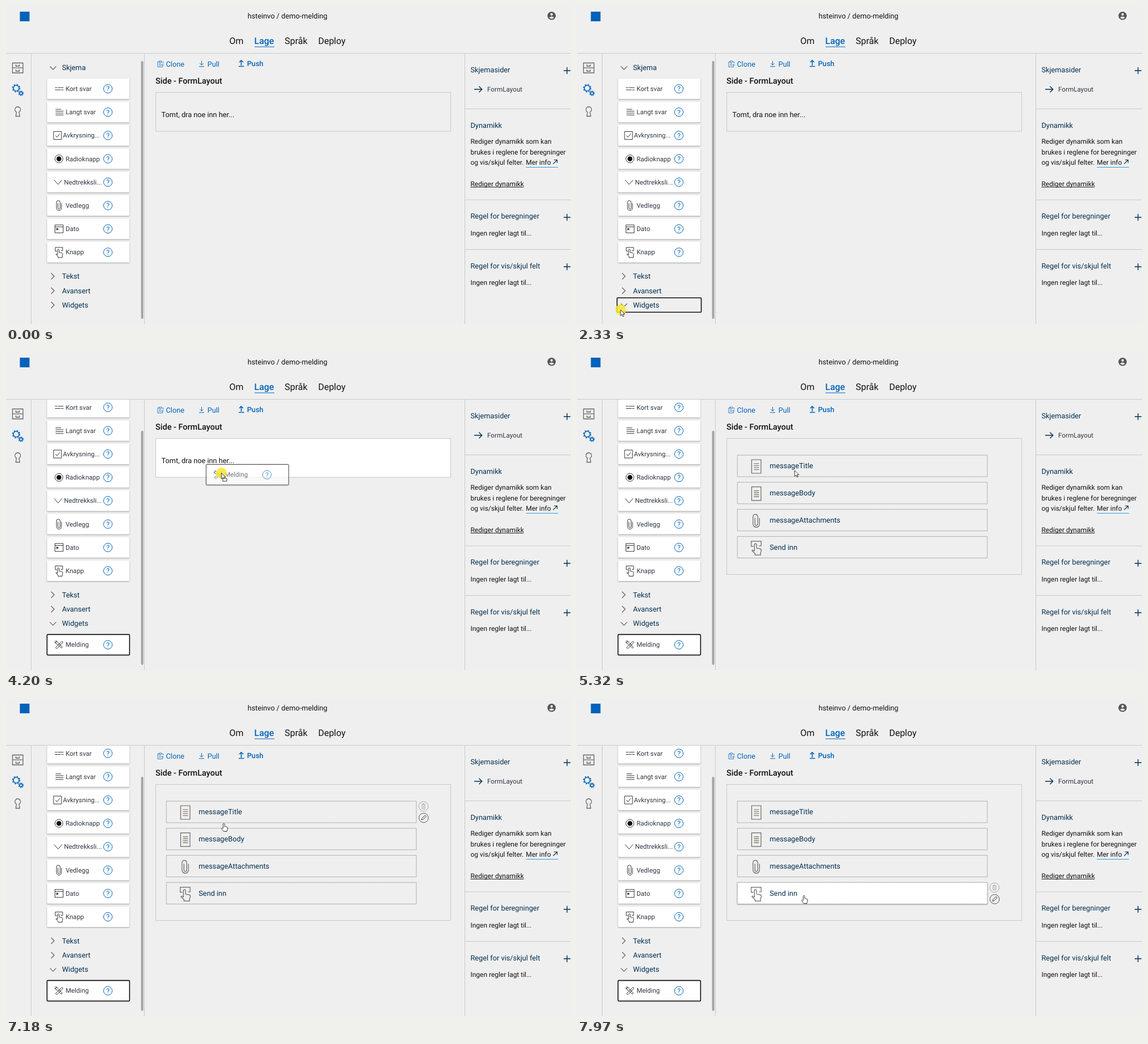
An HTML page that plays this animation: 998 px wide and 561 px high, repeating every 8000 ms.

```html
<!DOCTYPE html>
<html lang="no">
<head>
<meta charset="utf-8">
<title>Demo</title>
<style>
  html, body { margin: 0; width: 100%; height: 100%; overflow: hidden; background: #efefef; }
  svg { display: block; font: 12.76px Roboto, sans-serif; text-rendering: geometricPrecision; }
  text { fill: #022f51; white-space: pre; }
  .nav { font-size: 15.95px; }
  .dark text, text.dark { fill: #111; }
  .blue text, text.blue { fill: #0062ba; }
  .small { font-size: 11.96px; }
  .label { font-size: 11.5px; fill: #303944; }
  .bold { font-weight: 500; }
  .line { fill: none; stroke: #c9c9c9; }
  .icon { fill: none; stroke: #333; }
  .gray { fill: none; stroke: #666; stroke-width: 1.3; }
  .navy { fill: none; stroke: #022f51; stroke-width: 1.4; }
  .azure { fill: none; stroke: #0062ba; }
  .thin { stroke-width: .8; }
  .card { fill: #fff; filter: drop-shadow(0 1px 1px #0005); }
  .focus { fill: none; stroke: #111; stroke-width: 1.6; }
  #ghost .focus { stroke-width: 1.1; }
  .pointer path { fill: #fff; stroke: #222; stroke-width: .9; stroke-linejoin: round; }
</style>
</head>
<body>
<svg width="998" height="561" viewBox="0 0 998 561">
  <defs>
    <clipPath id="paletteClip"><path d="M45 84h199v462H45z"/></clipPath>
    <g id="short"><path d="M-7-2h4m1 0h10M-7 2h10m1 0h4"/></g>
    <g id="long"><path d="M-6-5H4M-6-1.7H8M-6 1.7H8M-6 5H8"/></g>
    <g id="check"><path d="M-9.5-7h14v14h-14zM-6 0l2.5 3 5-6"/></g>
    <g id="radio"><circle r="7"/><circle r="4.3" fill="#111" stroke="none"/></g>
    <g id="drop"><path d="M-8.5-4L-1.5 4L5.5-4"/></g>
    <g id="clip"><path d="M-1.7-4V4.500a1.900 1.900 0 0 0 3.800 0V-5.500a3.200 3.200 0 0 0-6.400 0V4.500a4.400 4.400 0 0 0 8.800 0V-4"/></g>
    <g id="date"><path d="M-7-7H7.500V7H-7zM-7-3.500H7.500"/><path d="M-4.500-.5h3v2h-3z" fill="#a44"/></g>
    <g id="tap"><path d="M-3.500-2H-6.500V-8.500H6.500V-2.500H3.500M-2.300 4.500V-4a1.400 1.400 0 0 1 2.800 0V.5l4.500.8q2 .4 1.700 2.600L5.800 6.500V9.500H-1.500V7.500L-5.500 3.800q.7-1.900 3.200.7"/></g>
    <g id="tools"><path d="M-6 5L4-5l2-1 1 1-1 2L-4 7zM-6-7l3 1 2 3 7 7-1.500 2-7-7-3-1-2-3 2 1 1.500-1z"/></g>
    <g id="doc"><path d="M-8-12H8.500V12H-8z"/><path d="M-4-5H5M-4-1.500H5M-4 2H5M-4 5.500H5" stroke="#765"/></g>
    <path id="plus" class="navy" d="M-6 0H6M0-6V6"/>
    <g id="arrow" class="pointer"><path d="M0 0v10.300l2.400-2.200 1.700 3.700 1.700-.8-1.600-3.500h3.300z"/></g>
    <g id="drag" class="pointer"><path d="M0 0v10.300l2.400-2.200 1.700 3.700 1.700-.8-1.600-3.500h3.300z"/><path d="M2.500 9.500h7v5h-7z"/></g>
    <g id="hand" class="pointer"><path d="M-1.500 8V1.200a1.300 1.300 0 0 1 2.600 0V5q1.500-.6 2 .6 1.300-.4 1.700.7 1.500-.2 1.500 1.200v2.300L5 14H-.5L-4.500 8.800q.8-1.600 3-.3z"/></g>
    <g id="grab" class="pointer"><path d="M-2 7V1.500q1.200-1.400 2 0 1-1.600 2 0 1.200-1 2 .6 1.500-.5 1.500 1V8L4.500 12.500H-1L-4.500 7q.8-1.600 2.500 0z"/></g>
  </defs>

  <rect width="998" height="561" fill="#efefef"/>
  <rect x="24.5" y="10" width="17" height="17" fill="#0062ba"/>
  <text class="dark" x="497.2" y="21.700" text-anchor="middle">hsteinvo / demo-melding</text>
  <g fill="#555"><circle cx="963.7" cy="17.3" r="7.3"/><g fill="#efefef"><circle cx="963.7" cy="14.7" r="2.2"/><path d="M959.3 20.500q4.400-4 8.800 0-4.400 4-8.800 0z"/></g></g>
  <g class="nav dark">
    <text x="394.6" y="67">Om</text><text x="492.3" y="67">Språk</text><text x="551.5" y="67">Deploy</text>
  </g>
  <text class="nav blue bold" x="438.5" y="67">Lage</text>
  <path class="azure" d="M439 72h35"/>
  <path class="line" d="M0 83.500H998M44.500 84V561M244.500 84V561M810.500 84V561M811 181.500H998M811 342H998M811 429.500H998"/>

  <path class="gray" d="M11.500 100.500h18.500v17.500h-18.500zM11.500 109.200h18.500M17.500 103v3h6v-3M17.500 112v3h6v-3"/>
  <g class="azure" stroke-width="1.6">
    <circle cx="18" cy="145" r="5"/><circle cx="18" cy="145" r="6.5" stroke-dasharray="2.5 2.6"/>
    <circle cx="26.5" cy="154" r="2.5"/><circle cx="26.5" cy="154" r="4" stroke-dasharray="1.6 1.54"/>
  </g>
  <path class="gray" d="M18.500 187.200a5 5 0 1 1 4.500 0l1.300 7.300h-7z"/>

  <g id="palette" clip-path="url(#paletteClip)"><g id="content"></g></g>
  <rect id="thumb" x="238.6" width="4" rx="2" fill="#a3a3a3"/>

  <g class="azure">
    <path class="thin" d="M270 98.500h-2v9h8.500v-2M276 98.500h1.500v3M270.500 97h4v2.500h-4zM270 102h4M270 104.500h4M279 104h-4l1.500-1.500M275 104l1.500 1.500"/>
    <path d="M345.500 97v7M342.500 101.200l3 3 3-3M341 106.800h9"/>
    <path d="M415.500 105V96M412 99.300l3.500-3.500 3.500 3.500M411 106.500h9.500" stroke-width="1.6"/>
  </g>
  <g class="blue"><text x="282.5" y="107">Clone</text><text x="355.7" y="107">Pull</text><text class="bold" x="425.7" y="105.5">Push</text></g>
  <text class="dark bold" x="264" y="136.5" style="font-size:14.5px">Side - FormLayout</text>
  <rect id="panel" class="line" x="264.5" y="152.5" width="521" height="68.5"/>
  <text id="empty" class="dark" x="274.6" y="196">Tomt, dra noe inn her...</text>
  <g id="items"></g>

  <text x="820.5" y="117">Skjemasider</text>
  <path class="navy" d="M827 147h13.500M835.500 141.700l5.300 5.300-5.300 5.300"/>
  <text class="label" x="850" y="151" style="font-size:11.7px">FormLayout</text>
  <text x="820.5" y="215">Dynamikk</text>
  <g class="small dark">
    <text x="820.5" y="243">Rediger dynamikk som kan</text>
    <text x="820.5" y="261.5">brukes i reglene for beregninger</text>
    <text x="820.5" y="280">og vis/skjul felter.</text>
    <text x="918.3" y="280">Mer info</text>
    <text x="820.5" y="317.5">Rediger dynamikk</text>
    <text x="820.5" y="404.7">Ingen regler lagt til...</text>
    <text x="820.5" y="492">Ingen regler lagt til...</text>
  </g>
  <path d="M918.500 284.500H975" stroke="#2a9fe0"/>
  <path d="M820.500 319.500h94" stroke="#222"/>
  <path class="navy" d="M966.500 278.500l6.500-6.500M968 271.500h5.500v5.500" style="stroke-width:1.1"/>
  <text x="820.5" y="375.200">Regel for beregninger</text>
  <text x="820.5" y="462.500">Regel for vis/skjul felt</text>
  <use href="#plus" x="991" y="114"/><use href="#plus" x="991" y="372.7"/><use href="#plus" x="991" y="460"/>

  <g id="ghost" opacity=".7"></g>
  <circle id="press" r="9.5" fill="#f7e733" opacity=".85"/>
  <use id="cursor"/>
</svg>
<script>
const $ = id => document.getElementById(id);
const show = (el, on) => el.setAttribute('visibility', on ? 'visible' : 'hidden');
const set = (el, attrs) => { for (const k in attrs) el.setAttribute(k, attrs[k]); };

const LOOP = 8000, SCROLL = 48.4, PITCH = 47.8, ROW_TOP = 182, MELDING_Y = 564.9;

const card = (icon, label, y, x = 105.2) => `
  <rect class="card" x="72.5" y="${y - 18.3}" width="145.5" height="36.3" rx="1"/>
  <use class="icon" href="#${icon}" x="93.5" y="${y}"/>
  <text class="label" x="${x}" y="${y + 4}">${label}</text>
  <circle class="azure" cx="180" cy="${y}" r="7.6"/>
  <text class="blue" x="180" y="${y + 4.3}" text-anchor="middle" style="font-size:12px">?</text>`;

const section = (label, y, open) => `
  <text x="99" y="${y + 4.3}">${label}</text>
  <path class="gray" d="${open ? `M77.5 ${y - 2.5}l5.5 5.5 5.5-5.5` : `M79.7 ${y - 5.5}l5.5 5.5-5.5 5.5`}"/>`;

const cards = [
  ['short', 'Kort svar'], ['long', 'Langt svar'], ['check', 'Avkrysning...', 100.5], ['radio', 'Radioknapp'],
  ['drop', 'Nedtrekksli...', 102.5], ['clip', 'Vedlegg'], ['date', 'Dato'], ['tap', 'Knapp']];

const melding = card('tools', 'Melding', MELDING_Y);
const outline = '<rect class="focus" x="72.5" y="546.8" width="145.8" height="36.1" rx="1.5"/>';

$('content').innerHTML = section('Skjema', 109, true)
  + cards.map(([icon, label, x], i) => card(icon, label, 146 + 41.2 * i, x)).join('')
  + section('Tekst', 476.7) + section('Avansert', 502.2)
  + `<g id="closed">${section('Widgets', 527.5)}</g>
     <g id="opened">${section('Widgets', 527.5, true)}${melding}</g>
     <rect id="widgetFocus" class="focus" x="70.7" y="514.7" width="148.8" height="25.5" rx="1.5"/>
     <g id="meldingFocus">${outline}</g>`;

$('ghost').innerHTML = melding + outline;

const rows = [['doc', 'messageTitle', 1], ['doc', 'messageBody', 1], ['clip', 'messageAttachments', 1.3], ['tap', 'Send inn', 1.35]];
$('items').innerHTML = rows.map(([icon, label, scale], i) => `
  <g transform="translate(0 ${ROW_TOP + PITCH * i})">
    <rect class="card" id="hover${i}" x="283" width="442" height="38"/>
    <rect x="283.3" width="441.5" height="38" fill="none" stroke="#888" stroke-width=".8" stroke-dasharray="1.5 .5"/>
    <use class="gray" href="#${icon}" transform="translate(316.5 20) scale(${scale})" style="stroke-width:${1.2 / scale}"/>
    <text x="340.3" y="23.3">${label}</text>
  </g>`).join('') + `
  <g id="rowTools" class="gray" style="stroke-width:1">
    <g stroke="#aaa"><circle cx="737.5" cy="9" r="8.3"/><path d="M734 6h7M736.5 6v-1.5h2V6M735 6.5v6.5h5V6.5M737.5 8v3.5"/></g>
    <circle cx="737.7" cy="29.5" r="8.3" stroke="#555"/><path d="M734 33l.8-3 5.5-5 2 2-5.5 5.2z" stroke="#444"/>
  </g>`;

// Progress from 0 to 1 in n held poses, the first at a and the last at b.
const steps = (t, a, b, n) =>
  Math.max(0, Math.min(1, Math.floor((t - a) / (b - a) * (n - 1) + .03) / (n - 1)));
const lerp = (a, b, p) => a + (b - a) * p;
const bend = (a, c, b, p) => lerp(lerp(a, c, p), lerp(c, b, p), p);

function dragOffset(t) {
  const p = steps(t, 3610, 4200, 5), nudge = t >= 4820 ? 1 : 0;
  return [281 * p + 2 * nudge, -300 * (p + 1.55 * p * (1 - p)) - 4 * nudge];
}

function pointer(t) {
  if (t < 1870) {
    const p = steps(t, 770, 1710, 7);
    return ['arrow', bend(210, -30, 89, p), bend(186, 480, 525, p)];
  }
  if (t < 2190) return ['arrow', 74.5, 529];
  if (t < 2490) return ['arrow', 77, 536];
  if (t < 2800) return ['arrow', 69, 520];
  if (t < 3610) {
    const p = steps(t, 2800, 3110, 3);
    return ['grab', lerp(84, 115.5, p), lerp(520, 515.5, p)];
  }
  if (t < 5320) {
    const [dx, dy] = dragOffset(t);
    return ['drag', 99.5 + dx, 513.5 + dy];
  }
  if (t < 6250) return ['arrow', 384.5, 209];
  if (t < 7180) return ['hand', 385, 209.5];
  const p = steps(t, 7180, 7970, 6);
  return ['hand', lerp(385, 401, p), lerp(221.5, 348.5, p)];
}

function draw(t) {
  const [shape, x, y] = pointer(t);
  const dragging = t >= 3610 && t < 5320, dropped = t >= 5320, open = t >= 2190;
  const scroll = steps(t, 2190, 2490, 3);

  set($('cursor'), { href: '#' + shape, x, y });
  show($('cursor'), t >= 770);
  set($('press'), { cx: x, cy: y });
  show($('press'), open && t < 2490 || dragging);

  set($('content'), { transform: `translate(0 ${-SCROLL * scroll})` });
  const top = lerp(97, 139, scroll);
  set($('thumb'), { y: top, height: 552 - top });
  show($('closed'), !open);
  show($('opened'), open);
  show($('widgetFocus'), open && t < 3610);
  show($('meldingFocus'), t >= 3610);

  const [dx, dy] = dragOffset(t);
  set($('ghost'), { transform: `translate(${dx} ${dy - SCROLL})` });
  show($('ghost'), dragging);

  const over = dragging && x > 264 && y < 221;
  $('panel').style.fill = over ? '#fff' : 'none';
  set($('panel'), { height: dropped ? 240 : 68.5 });
  show($('empty'), !dropped);
  show($('items'), dropped);

  const row = Math.floor((y - ROW_TOP) / PITCH);
  const hovering = t >= 5480 && y - ROW_TOP - row * PITCH < 38;
  rows.forEach((_, i) => show($('hover' + i), hovering && i === row));
  set($('rowTools'), { transform: `translate(0 ${ROW_TOP + PITCH * row})` });
  show($('rowTools'), t >= 5480);
}

const start = performance.now();
(function frame() {
  draw((performance.now() - start) % LOOP);
  requestAnimationFrame(frame);
})();
</script>
</body>
</html>
```
